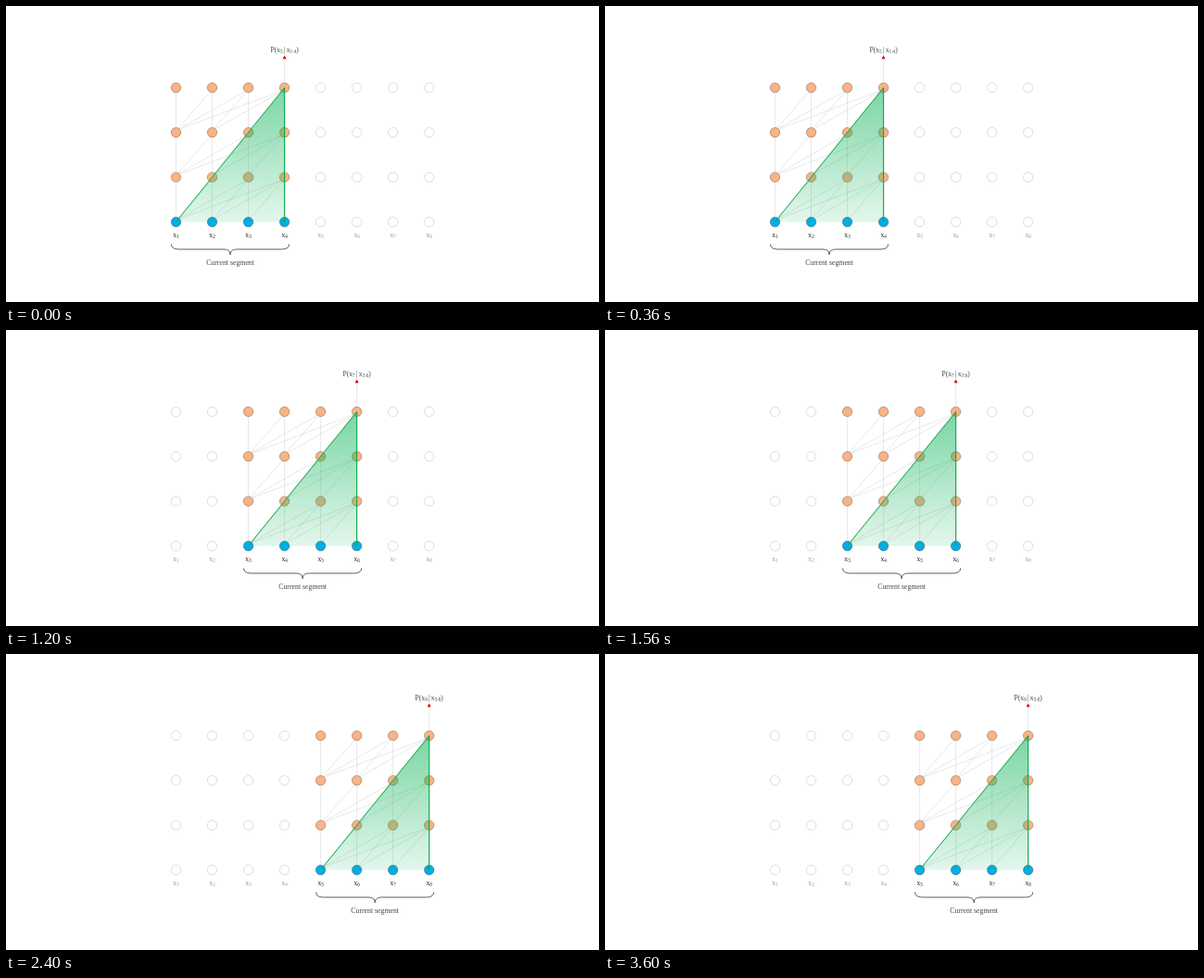
These frames come from a looping animation (640x320 px, 4.4 s). An HTML page with a canvas:

```html
<!DOCTYPE html>
<html lang="en">
<head>
<meta charset="utf-8">
<title>Sliding segment</title>
<style>
  html, body { margin: 0; width: 100%; height: 100%; overflow: hidden; background: #fff; }
  canvas { display: block; width: 640px; height: 320px; }
</style>
</head>
<body>
<canvas id="stage" width="640" height="320"></canvas>
<script>
const ctx = document.getElementById('stage').getContext('2d');
const LOOP = 4400, STEP = 600, LAST = 4;
const COLS = 8, ROWS = 4, SPAN = 4, R = 5.2;
const colX = i => 183.5 + 39.03 * i;
const rowY = r => 233.5 - 48.4 * r;   // row 0 is the input row
const SERIF = '"Liberation Serif", "Times New Roman", serif';

function line(x1, y1, x2, y2, color, width) {
  ctx.beginPath();
  ctx.moveTo(x1, y1);
  ctx.lineTo(x2, y2);
  ctx.strokeStyle = color;
  ctx.lineWidth = width;
  ctx.stroke();
}

function node(x, y, fill, stroke) {
  ctx.beginPath();
  ctx.arc(x, y, R, 0, Math.PI * 2);
  ctx.fillStyle = fill;
  ctx.fill();
  ctx.strokeStyle = stroke;
  ctx.lineWidth = 0.7;
  ctx.stroke();
}

// Parts are [text, isSubscript, gapBefore]; the whole run is centred on x.
function formula(parts, x, y, color) {
  const font = sub => (sub ? 5.2 : 7.6) + 'px ' + SERIF;
  const widths = parts.map(([text, sub, gap = 0]) => {
    ctx.font = font(sub);
    return ctx.measureText(text).width + gap;
  });
  let left = x - widths.reduce((a, b) => a + b, 0) / 2;
  ctx.textAlign = 'left';
  ctx.fillStyle = color;
  parts.forEach(([text, sub, gap = 0], i) => {
    ctx.font = font(sub);
    ctx.fillText(text, left + gap, y + (sub ? 1.2 : 0));
    left += widths[i];
  });
}

function links(first) {
  const last = first + SPAN - 1;
  for (let r = 0; r < ROWS - 1; r++) {
    for (let i = first; i <= last; i++) {
      for (let j = i; j <= last; j++) {
        line(colX(i), rowY(r) - 2, colX(j), rowY(r + 1) + 2, 'rgba(110,110,110,0.32)', 0.5);
      }
    }
  }
}

function field(x1, x2, edge) {
  const top = rowY(ROWS - 1), bottom = rowY(0);
  const shade = ctx.createLinearGradient(0, top, 0, bottom);
  shade.addColorStop(0, 'rgba(0,176,80,0.52)');
  shade.addColorStop(1, 'rgba(0,176,80,0.11)');
  ctx.beginPath();
  ctx.moveTo(x1, bottom);
  ctx.lineTo(x2, top);
  ctx.lineTo(x2, bottom);
  ctx.fillStyle = shade;
  ctx.fill();
  line(x1, bottom, x2, top, '#08a843', 1);
  line(x2, top, x2, bottom, edge, 1.1);
}

function arrow(x) {
  ctx.setLineDash([1.5, 0.8]);
  line(x, rowY(ROWS - 1) - R, x, 57, '#cfc4c4', 0.7);
  ctx.setLineDash([]);
  ctx.beginPath();
  ctx.moveTo(x, 53.3);
  ctx.lineTo(x + 2, 57.2);
  ctx.lineTo(x - 2, 57.2);
  ctx.fillStyle = '#c8100c';
  ctx.fill();
}

function brace(x) {
  const half = 63.5, top = 257.5, mid = 263, tip = 268.8;
  ctx.beginPath();
  for (const d of [-1, 1]) {
    ctx.moveTo(x + d * half, top);
    ctx.bezierCurveTo(x + d * half, mid - 1, x + d * (half - 4), mid, x + d * (half - 9), mid);
    ctx.lineTo(x + d * 8, mid);
    ctx.bezierCurveTo(x + d * 3, mid, x, mid + 1.5, x, tip);
  }
  ctx.strokeStyle = '#333';
  ctx.lineWidth = 0.8;
  ctx.stroke();
}

function draw(first) {
  const last = first + SPAN - 1;
  const mid = (colX(first) + colX(last)) / 2;
  ctx.fillStyle = '#fff';
  ctx.fillRect(0, 0, 640, 320);

  links(first);
  for (let i = 0; i < COLS; i++) {
    const active = i >= first && i <= last;
    for (let r = 0; r < ROWS; r++) {
      const fill = !active ? '#fff' : r ? '#f9b384' : '#00aeea';
      const stroke = !active ? '#cfcfcf' : r ? '#92816f' : '#56727c';
      node(colX(i), rowY(r), fill, stroke);
    }
    formula([['x'], [i + 1, true]], colX(i), 250.2, active ? '#222' : '#999');
  }

  field(colX(first), colX(last), first === 1 ? '#47705a' : '#08a843');
  arrow(colX(last));
  formula([
    ['P(x'], [last + 2, true], ['|', false, 1.3],
    ['x', false, 1.3], [(first + 1) + ':' + (last + 1), true], [')']
  ], colX(last), 50.2, '#444');

  brace(mid);
  ctx.font = '7.8px ' + SERIF;
  ctx.textAlign = 'center';
  ctx.fillStyle = '#444';
  ctx.fillText('Current segment', mid, 280.2);
}

function tick() {
  const t = performance.now() % LOOP;
  draw(Math.min(LAST, Math.floor(t / STEP)));
  requestAnimationFrame(tick);
}
tick();
</script>
</body>
</html>
```
